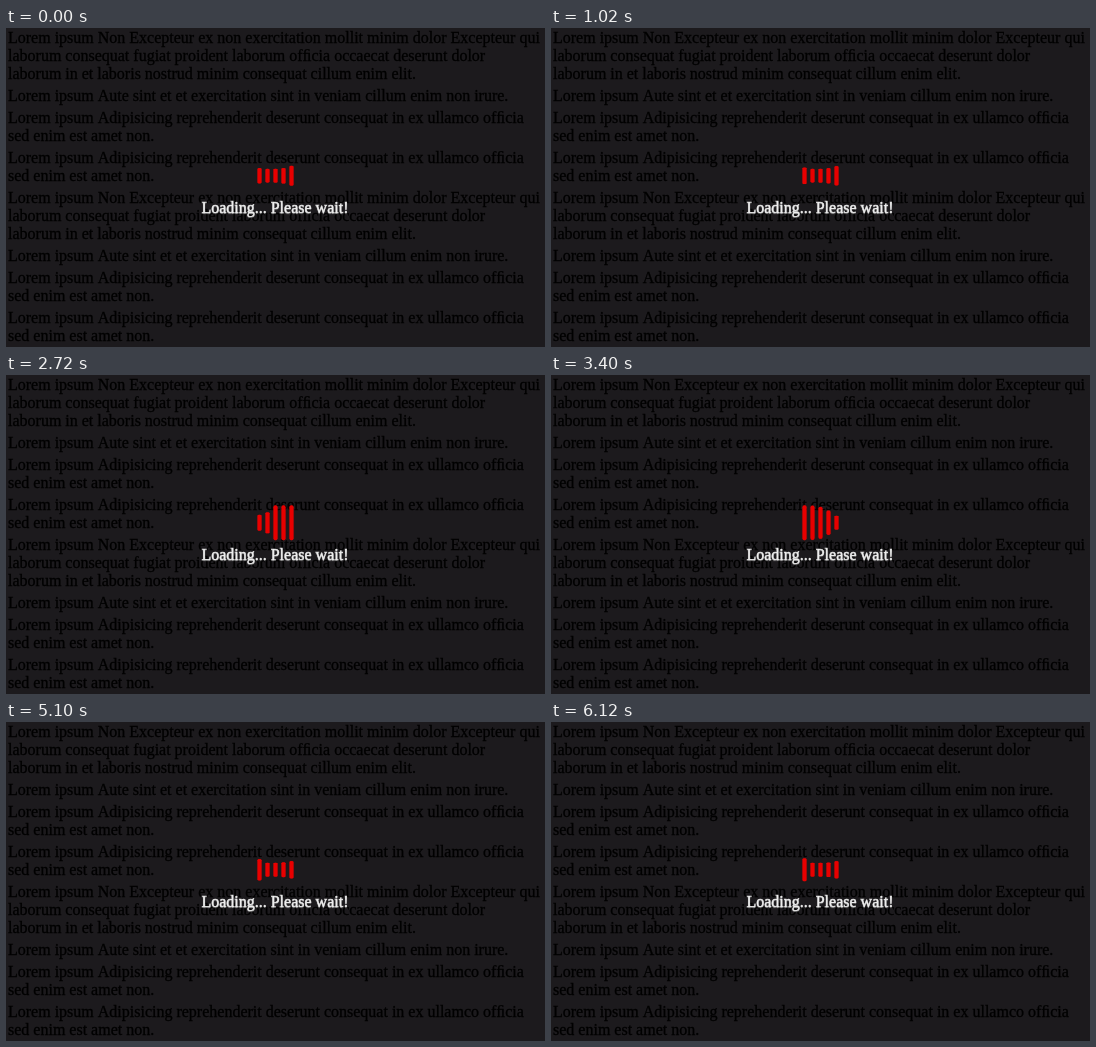
Animation of 539 by 319 pixels, one loop 6.29 s. Source, as an HTML page:

```html
<!DOCTYPE html>
<html lang="en">
<head>
<meta charset="utf-8">
<title>Loading</title>
<style>
  html, body { margin: 0; width: 100%; height: 100%; overflow: hidden; background: #1c1a1d; }
  body { position: relative; font: 16px/18px "Liberation Serif", Times, serif; font-kerning: none; white-space: nowrap; }
  #page { position: absolute; left: 2px; top: 1px; color: #000; -webkit-text-stroke: .3px #000; }
  p { margin: 0 0 4px; }
  #label {
    position: absolute; left: 195.4px; top: 171px; color: #eee;
    -webkit-text-stroke: .45px #eee; text-shadow: 0 1px 1px #eee8;
  }
  .bar {
    position: absolute; left: 251px; top: 130px; width: 4px; height: 35px;
    border-radius: 2px; background: #e80000; box-shadow: 0 0 1px #e80000a0;
  }
</style>
</head>
<body>
<div id="page"></div>
<div id="label">Loading... Please wait!</div>
<script>
const STEP = 170, STEPS = 37;
const long = "Lorem ipsum Non Excepteur ex non exercitation mollit minim dolor Excepteur qui<br>" +
  "laborum consequat fugiat proident laborum officia occaecat deserunt dolor<br>" +
  "laborum in et laboris nostrud minim consequat cillum enim elit.";
const short = "Lorem ipsum Aute sint et et exercitation sint in veniam cillum enim non irure.";
const medium = "Lorem ipsum Adipisicing reprehenderit deserunt consequat in ex ullamco officia<br>" +
  "sed enim est amet non.";
const block = [long, short, medium, medium];
// The paragraphs are set with the fi ligature
document.getElementById("page").innerHTML = [...block, ...block]
  .map(text => `<p>${text.replaceAll("fi", "\uFB01")}</p>`).join("");

const bars = Array.from({ length: 5 }, () => {
  const bar = document.createElement("div");
  bar.className = "bar";
  document.body.append(bar);
  return bar;
});

// cubic-bezier(.2, .68, .18, 1.08)
const bezier = (a, b, u) => 3 * (1 - u) ** 2 * u * a + 3 * (1 - u) * u * u * b + u ** 3;
function ease(x) {
  let lo = 0, hi = 1;
  for (let i = 0; i < 24; i++) {
    const mid = (lo + hi) / 2;
    if (bezier(.2, .18, mid) < x) lo = mid; else hi = mid;
  }
  return bezier(.68, 1.08, lo);
}

// Shrinks to 0.4 in the first half second, grows back in the next
function scale(seconds) {
  const phase = seconds % 1;
  return phase < .5 ? 1 - .6 * ease(phase * 2) : .4 + .6 * ease(phase * 2 - 1);
}

const start = performance.now();
function draw() {
  const step = Math.floor(Math.max(0, performance.now() - start) / STEP) % STEPS;
  const seconds = .11 + .168 * step;
  bars.forEach((bar, i) => {
    bar.style.transform = `translate(${8 * i + .5}px, .25px) scaleY(${scale(seconds + .1 * (4 - i))})`;
  });
  requestAnimationFrame(draw);
}
draw();
</script>
</body>
</html>
```
